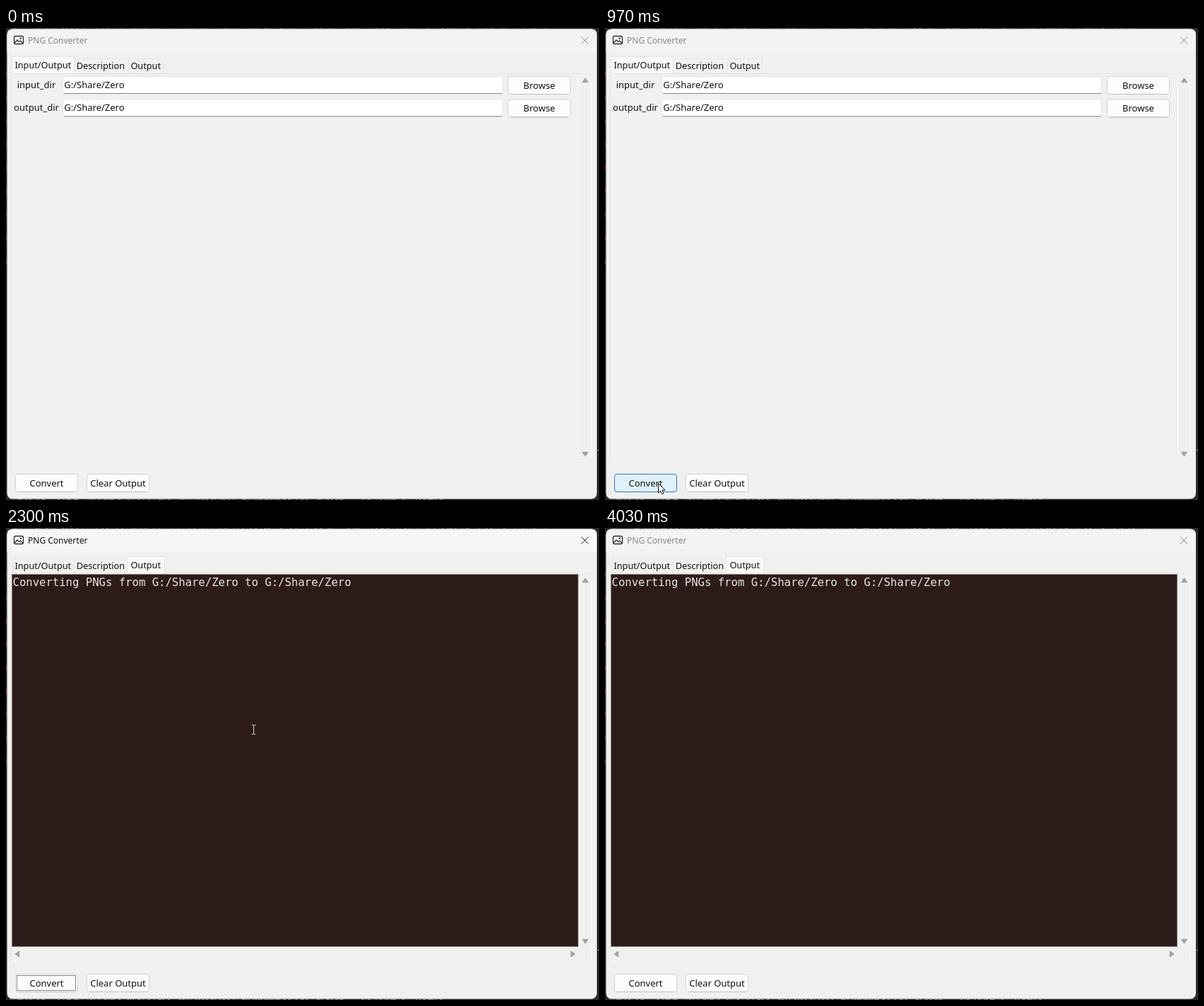
Animation of 839x667 px, one loop 5 s. Source, as an HTML page:

```html
<!DOCTYPE html>
<html lang="en">
<head>
<meta charset="utf-8">
<title>PNG Converter</title>
<style>
  html, body { margin: 0; width: 100%; height: 100%; overflow: hidden; background: #2b2b2b; }
  svg { display: block; width: 839px; height: 667px; }
  text { font: 13px "Noto Sans", "Open Sans", sans-serif; fill: #111; white-space: pre; }
  .tab { font-size: 12.7px; }
  .title { font-size: 12px; fill: #868686; }
  .active .title { fill: #111; }
  .close { stroke: #868686; }
  .active .close { stroke: #111; }
  .bar { fill: #f3f3f3; }
  .active .bar { fill: #f6f6f6; }
  .log { font: 15.6px "DejaVu Sans Mono", "Noto Sans Mono", monospace; fill: #e8e6e6; }
  .face { fill: #fdfdfd; stroke: #d2d2d2; }
  .hover .face { fill: #e0f2fd; stroke: #3478c0; }
  .press .face { fill: #cbe1f5; stroke: #28659f; }
  .lip { stroke: #bdbdbd; }
  .hover .lip, .press .lip { stroke: none; }
</style>
</head>
<body>
<svg id="stage" viewBox="0 0 839 667"></svg>
<script>
const LOOP = 5000;
const stage = document.getElementById("stage");

function add(parent, tag, attrs, content) {
  const el = document.createElementNS("http://www.w3.org/2000/svg", tag);
  for (const key in attrs) el.setAttribute(key, attrs[key]);
  if (content) el.textContent = content;
  parent.append(el);
  return el;
}
const group = (parent, cls = "") => add(parent, "g", { class: cls });
const rect = (parent, x, y, width, height, more) =>
  add(parent, "rect", { x, y, width, height, ...more });
const path = (parent, d, more) => add(parent, "path", { d, fill: "none", ...more });
const label = (parent, x, y, content, cls = "", anchor = "middle") =>
  add(parent, "text", { x, y, class: cls, "text-anchor": anchor }, content);
const show = (el, on) => el.setAttribute("visibility", on ? "visible" : "hidden");

function random(seed) {
  return () => (seed = (seed * 16807) % 2147483647) / 2147483647;
}

// Slivers of a dark editor peeking out around the window
function drawBackdrop() {
  const rnd = random(41);
  rect(stage, 0, 0, 839, 667, { fill: "#2b2b2b" });
  for (let x = 12; x < 770; x += 3 + rnd() * 5) {
    const warm = (x > 205 && x < 345) || (x > 560 && x < 605);
    if (rnd() < 0.55) rect(stage, x, 0, 1 + rnd() * 3, 1, { fill: warm ? "#754832" : "#626262" });
  }
  for (let x = 6; x < 622; x += 3 + rnd() * 5) {
    if (rnd() < 0.75) rect(stage, x, 665.5, 1 + rnd() * 4, 1.5, { fill: "#777" });
  }
  for (let y = 62; y < 335; y += 33) rect(stage, 0, y, 1, 7, { fill: "#874b2e" });
  rect(stage, 837, 596, 2, 1, { fill: "#aaa" });
}

function button(parent, x, y, width, name) {
  const g = group(parent);
  rect(g, x + 0.5, y + 0.5, width - 1, 25, { rx: 3.5, class: "face" });
  path(g, `M${x + 4} ${y + 25.5}h${width - 8}`, { class: "lip" });
  label(g, x + width / 2, y + 18, name);
  return g;
}

function field(parent, y, name) {
  label(parent, 43, y + 17, name);
  rect(parent, 80.5, y + 0.5, 622, 24, { rx: 2.5, fill: "#fff", stroke: "#e6e6e6" });
  path(parent, `M82 ${y + 24.5}H702`, { stroke: "#868686" });
  label(parent, 82.3, y + 17, "G:/Share/Zero", "", "start");
  button(parent, 710, y, 89, "Browse");
}

function arrowhead(parent, x, y, angle) {
  path(parent, "M-4 3.2Q-4.8 3 -4 1.8L-.8 -2.8Q0 -3.8 .8 -2.8L4 1.8Q4.8 3 4 3.2Z",
    { fill: "#a2a2a2", transform: `translate(${x} ${y}) rotate(${angle})` });
}

function tabs(parent, selected) {
  const items = [["Input/Output", 10, 96, 52.3], ["Description", 96, 173, 134], ["Output", 173, 222, 197.7]];
  items.forEach(([name, left, right, mid], i) => {
    const on = i === selected;
    const x = on ? left - 2 : left;
    const y = on ? 40 : 43;
    const width = right - x + (on && i ? 2 : 0);
    rect(parent, x + 0.5, y + 0.5, width, 64 - y,
      { fill: on ? "#f9f9f9" : "#f0f0f0", stroke: "#e5e5e5" });
    label(parent, mid, on ? 56.7 : 58.3, name, "tab");
  });
}

drawBackdrop();
const win = group(stage);
rect(win, 1.5, 1.5, 834.5, 664, { rx: 8, fill: "#f0f0f0" });
path(win, "M1.5 34V9.5Q1.5 1.5 9.5 1.5H828Q836 1.5 836 9.5V34Z", { class: "bar" });
rect(win, 11.5, 11.5, 13, 11, { rx: 2, fill: "none", stroke: "#2c2c2c", "stroke-width": 1.3 });
path(win, "M12 21L16 17L18.5 19.5L20.5 18L24 21.5", { stroke: "#2c2c2c", "stroke-width": 1.3 });
add(win, "circle", { cx: 20.7, cy: 14.8, r: 1.2, fill: "#2c2c2c" });
label(win, 31, 21.5, "PNG Converter", "title", "start");
path(win, "M814 12.5L824 22.5M824 12.5L814 22.5", { class: "close" });

rect(win, 7.5, 64.5, 821, 547, { fill: "#f0f0f0", stroke: "#e7e7e7" });
path(win, "M8 611.5H828.5V65", { stroke: "#f8f8f8" });

const form = group(win);
tabs(form, 0);
field(form, 68, "input_dir");
field(form, 100.4, "output_dir");
path(form, "M810.5 65V611", { stroke: "#fafafa" });
arrowhead(form, 819.5, 74, 0);
arrowhead(form, 819.5, 602, 180);

const output = group(win);
tabs(output, 2);
rect(output, 8.5, 65.5, 801, 526, { fill: "#2d1b19", stroke: "#8b8280" });
label(output, 9.5, 82.3, "Converting PNGs from G:/Share/Zero to G:/Share/Zero", "log", "start");
arrowhead(output, 819.5, 74, 0);
arrowhead(output, 819.5, 584, 180);
arrowhead(output, 16, 602, -90);
arrowhead(output, 802, 602, 90);

const convert = button(win, 13, 630, 89, "Convert");
button(win, 114, 630, 89, "Clear Output");
const focusRing = rect(win, 15.5, 632.5, 83, 21,
  { fill: "none", stroke: "#111", "stroke-dasharray": "1 1" });

const click = add(stage, "circle", { cx: 74.5, cy: 644, r: 12, fill: "#f5b83d", "fill-opacity": 0.62 });
const pointer = path(stage, "M.5 .5V14L3.6 11.1L5.7 15.8L7.9 14.8L5.9 10.2H10Z",
  { fill: "#fff", stroke: "#111", "stroke-linejoin": "round" });
const beam = path(stage, "M-3 -6.5H-1L0 -6L1 -6.5H3M0 -6V6M-3 6.5H-1L0 6L1 6.5H3", { stroke: "#d7e4e6" });

// [time, x, y]; no place means the mouse is off the window
const moves = [
  [0], [270, 227, 648], [340, 188, 632], [410, 152, 621], [480, 127, 615],
  [550, 113, 615], [620, 104, 617], [690, 95, 621], [760, 88, 626],
  [830, 81, 635], [900, 77, 640], [970, 75, 643],
  [1950, 90, 627], [2020, 135, 570], [2090, 200, 482], [2160, 265, 395],
  [2230, 315, 327], [2290, 350, 285], [2360, 368, 264], [2430, 374, 257],
  [2980, 375, 273], [3050, 384, 330], [3120, 400, 425], [3190, 418, 530],
  [3260, 433, 642], [3330]
];

function draw(t) {
  const during = (from, to) => t >= from && t < to;
  win.setAttribute("class", during(1600, 4030) ? "active" : "");
  show(form, t < 1740);
  show(output, t >= 1740);
  convert.setAttribute("class", during(830, 1600) ? "hover" : during(1600, 1740) ? "press" : "");
  show(focusRing, during(1600, 4030));
  show(click, during(1600, 1740));

  const [, x, y] = moves.findLast(step => step[0] <= t);
  const inside = x !== undefined;
  const overLog = t >= 1740 && y < 591;
  show(pointer, inside && !overLog);
  show(beam, inside && overLog);
  if (inside) {
    const [mark, shift] = overLog ? [beam, 0.5] : [pointer, 0];
    mark.setAttribute("transform", `translate(${x + shift} ${y})`);
  }
}

const start = performance.now();
function tick() {
  draw((performance.now() - start) % LOOP);
  requestAnimationFrame(tick);
}
tick();
</script>
</body>
</html>
```
